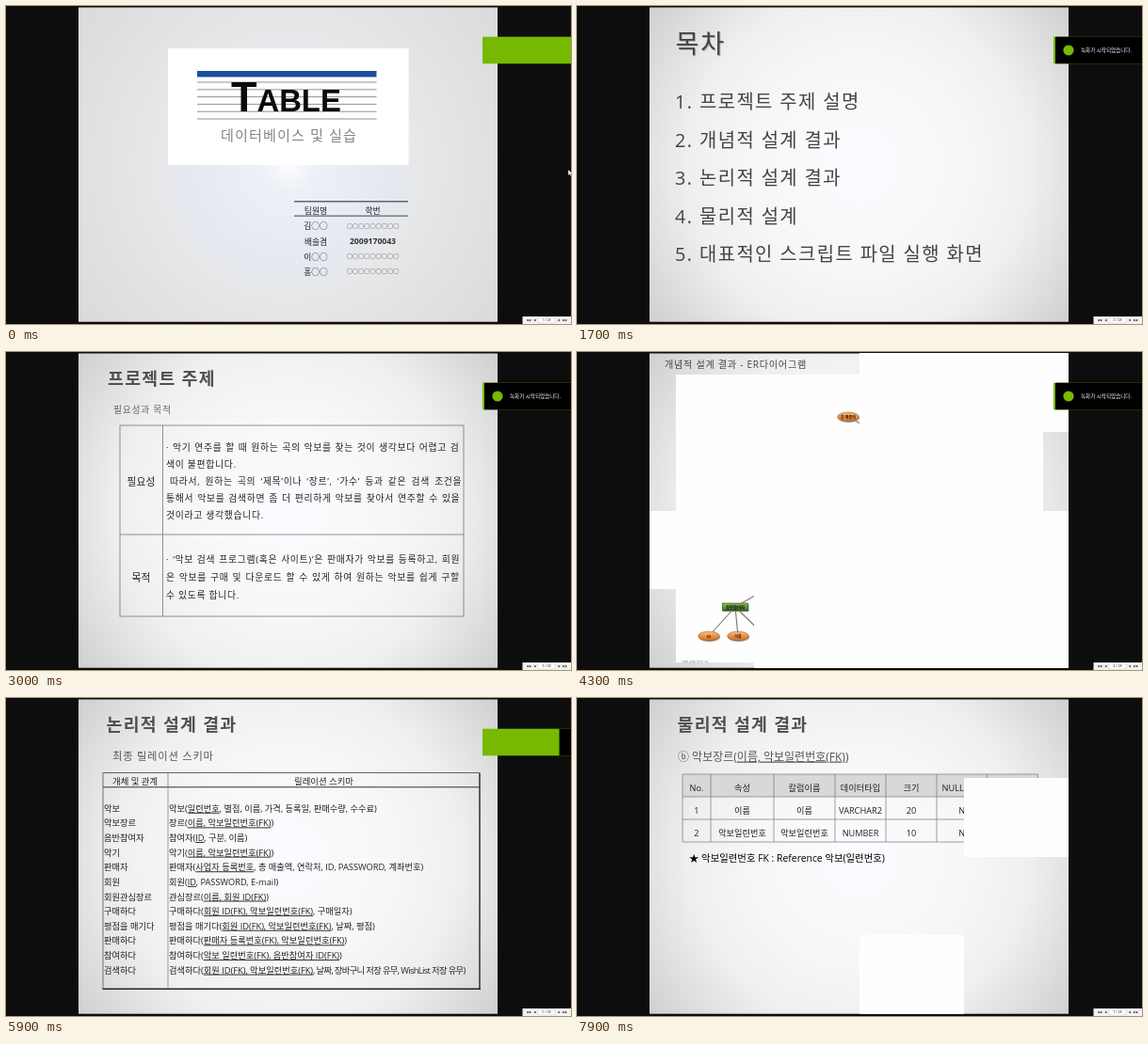
An HTML page for the animation above (8 s loop, 600x338 px).

```html
<!DOCTYPE html>
<html lang="ko">
<head>
<meta charset="utf-8">
<title>Table</title>
<style>
  html, body { margin: 0; width: 100%; height: 100%; overflow: hidden; background: #0d0d0d; }
  svg { display: block; width: 100%; height: 100%; }
  text { font-family: "Open Sans", "Noto Sans CJK KR", "Noto Sans CJK JP", "Noto Sans CJK", sans-serif; }
  .latin { font-family: "Liberation Sans", Arial, sans-serif; }
  .tight { letter-spacing: -.6px; }
</style>
</head>
<body>
<svg id="stage" viewBox="0 0 600 338">
  <defs>
    <radialGradient id="cover" gradientUnits="userSpaceOnUse" cx="300" cy="169" r="280">
      <stop offset="0" stop-color="#fbfcfe"/>
      <stop offset=".1" stop-color="#edf1f7"/>
      <stop offset=".4" stop-color="#e4e8ef"/>
      <stop offset=".48" stop-color="#e7e8ea"/>
      <stop offset="1" stop-color="#dadada"/>
    </radialGradient>
    <radialGradient id="plain" gradientUnits="userSpaceOnUse" cx="300" cy="169" r="280">
      <stop offset="0" stop-color="#fafcff"/>
      <stop offset=".4" stop-color="#f6f7f8"/>
      <stop offset=".65" stop-color="#efefef"/>
      <stop offset="1" stop-color="#cfcfcf"/>
    </radialGradient>
    <linearGradient id="orange" x2="0" y2="1">
      <stop offset="0" stop-color="#fbc08a"/>
      <stop offset=".5" stop-color="#ee8f3c"/>
      <stop offset="1" stop-color="#c9702a"/>
    </linearGradient>
    <linearGradient id="leaf" x2="0" y2="1">
      <stop offset="0" stop-color="#8cc152"/>
      <stop offset="1" stop-color="#3d6b22"/>
    </linearGradient>
  </defs>
  <rect width="600" height="338" fill="#0d0d0d"/>
  <g id="slides"></g>
  <g id="tiles"></g>
  <g id="pager"></g>
  <rect id="green" y="32.7" width="94" height="28.6" fill="#76b900"/>
  <g id="panel"></g>
  <path id="cursor" d="M0 0 L0 6 L1.6 4.7 L2.8 7 L3.8 6.5 L2.7 4.3 L4.6 4 Z" fill="#fff" stroke="#333" stroke-width=".4"/>
</svg>
<script>
const $ = id => document.getElementById(id);

// Text centred vertically on cy; _underscores_ mark underlined parts.
// Tracking makes the glyphs smaller and the spacing wider by the same share.
function text(x, cy, size, str, o = {}) {
  const track = o.track || 0, glyph = size * (1 - track);
  const body = str.replace(/_(.+?)_/g, '<tspan text-decoration="underline">$1</tspan>');
  return `<text x="${x}" y="${cy + glyph * 0.38}" font-size="${glyph}" letter-spacing="${glyph * track}"` +
    ` fill="${o.fill || '#222'}" font-weight="${o.weight || 400}" text-anchor="${o.anchor || 'start'}"` +
    ` word-spacing="${o.gap || 0}">${body}</text>`;
}
const mid = (x, cy, size, str, o) => text(x, cy, size, str, { ...o, anchor: 'middle' });
const loose = (x, cy, size, str, o) => text(x, cy, size, str, { ...o, track: 0.07 });
const rect = (x, y, w, h, fill, extra = '') =>
  `<rect x="${x}" y="${y}" width="${w}" height="${h}" fill="${fill}" ${extra}/>`;
const line = (x1, y1, x2, y2, color, w = 0.7) =>
  `<path d="M${x1} ${y1}L${x2} ${y2}" stroke="${color}" stroke-width="${w}"/>`;
const back = id => rect(77, 1.5, 445, 334.2, `url(#${id})`);
const heading = (x, str) => loose(x, 28, 19.7, str, { fill: '#505050', weight: 700 });

function coverSlide() {
  let s = back('cover') + rect(172, 45, 255.5, 124, '#fff') + rect(203, 69, 190.5, 6.5, '#1f4e9f');
  for (let i = 0; i < 6; i++) s += line(203, 81 + i * 7.8, 393.5, 81 + i * 7.8, '#777', 0.8);
  s += '<text class="latin" x="239" y="112" font-weight="700" font-size="45" fill="#0a0a0a">T<tspan font-size="32.8">ABLE</tspan></text>';
  s += text(300.5, 137, 16.3, '데이터베이스 및 실습', { fill: '#858585', anchor: 'middle', track: 0.07 });
  s += line(306, 207.7, 427, 207.7, '#5d6673', 1.5) + line(306, 223.2, 427, 223.2, '#5d6673', 1.3);
  s += mid(329, 217.5, 8.8, '팀원명', { weight: 500 }) + mid(389.5, 217.5, 8.8, '학번', { weight: 500 });
  ['김○○', '배솔겸', '이○○', '홍○○'].forEach((name, i) => {
    const y = 234 + i * 16.2;
    s += mid(329, y, 8.7, name, { weight: 500 });
    s += i === 1 ? mid(389.5, y, 8.6, '2009170043', { weight: 700, fill: '#333' })
                 : mid(389.5, y - 0.5, 6.2, '○'.repeat(9));
  });
  return s;
}

function contentsSlide() {
  const items = ['프로젝트 주제 설명', '개념적 설계 결과', '논리적 설계 결과', '물리적 설계', '대표적인 스크립트 파일 실행 화면'];
  return back('plain') +
    loose(105.5, 41, 29, '목차', { fill: '#aaa', weight: 500 }) +
    loose(104.5, 40, 29, '목차', { fill: '#444', weight: 500 }) +
    items.map((it, i) => loose(104, 101.8 + i * 40.4, 21.4, `${i + 1}. ${it}`, { fill: '#444' })).join('');
}

function topicSlide() {
  const rows = [
    [170, 101.5, '· 악기 연주를 할 때 원하는 곡의 악보를 찾는 것이 생각보다 어렵고 검', 0.5],
    [170, 119.5, '색이 불편합니다.'],
    [174, 137.5, '따라서, 원하는 곡의 ‘제목’이나 ‘장르’, ‘가수’ 등과 같은 검색 조건을', 1.9],
    [170, 155.5, '통해서 악보를 검색하면 좀 더 편리하게 악보를 찾아서 연주할 수 있을', 0.7],
    [170, 173.5, '것이라고 생각했습니다.'],
    [170, 220.5, '· ‘악보 검색 프로그램(혹은 사이트)’은 판매자가 악보를 등록하고, 회원', 0.6],
    [170, 239.5, '은 악보를 구매 및 다운로드 할 수 있게 하여 원하는 악보를 쉽게 구할', 0.8],
    [170, 258.5, '수 있도록 합니다.']
  ];
  return back('plain') + heading(108, '프로젝트 주제') +
    loose(114, 61.5, 10.6, '필요성과 목적', { fill: '#666' }) +
    rect(121, 78, 365, 203, 'none', 'stroke="#777" stroke-width=".8"') +
    line(121, 194, 486, 194, '#777', 0.8) + line(166.5, 78, 166.5, 281, '#777', 0.8) +
    mid(143.5, 137.5, 10.8, '필요성') + mid(143.5, 240, 10.8, '목적') +
    rows.map(([x, y, str, gap]) => loose(x, y, 10.6, str, { gap })).join('');
}

function diagramSlide() {
  const entities = [[168, 271, '음반참여자'], [300, 200, '악보'], [345, 100, '판매자'],
    [440, 220, '회원'], [310, 282, '악기'], [390, 282, '장르']];
  // x, y, label, owning entity
  const attrs = [[140, 302, 'ID', 0], [171, 302, '이름', 0], [200, 302, '구분', 0],
    [200, 164, '별점', 1], [226, 148, '이름', 1], [256, 140, '가격', 1], [225, 185, '등록일', 1],
    [288, 69, '총 매출액', 2], [330, 58, '연락처', 2], [368, 58, '계좌번호', 2],
    [472, 190, 'ID', 3], [478, 246, '암호', 3], [450, 258, 'E-mail', 3],
    [292, 312, '이름', 4], [325, 312, '번호', 4], [390, 312, '이름', 5]];
  // x, y, label, linked entities
  const links = [[225, 238, '참여', 0, 1], [324, 150, '판매', 1, 2], [370, 188, '구매', 1, 3],
    [375, 220, '검색', 1, 3], [306, 242, '연주', 1, 4], [420, 255, '관심', 3, 5]];
  const tie = (x, y, e) => line(x, y, entities[e][0], entities[e][1], '#777', 1.1);
  let s = back('plain') + rect(105, 24, 390, 306, '#fefefe') +
    loose(93, 13, 10.9, '개념적 설계 결과 - ER다이어그램', { fill: '#444' });
  attrs.forEach(([x, y, , e]) => s += tie(x, y, e));
  links.forEach(([x, y, , a, b]) => s += tie(x, y, a) + tie(x, y, b));
  attrs.forEach(([x, y, label]) => s +=
    `<ellipse cx="${x + 0.8}" cy="${y + 1}" rx="11.5" ry="5" fill="#aaa"/>` +
    `<ellipse cx="${x}" cy="${y}" rx="11.3" ry="5" fill="url(#orange)" stroke="#8a5a33" stroke-width=".6"/>` +
    mid(x, y, 4, label, { weight: 700 }));
  links.forEach(([x, y, label]) => s +=
    `<path d="M${x - 14} ${y}l14 -7l14 7l-14 7z" fill="#9db7d6" stroke="#4a6484" stroke-width=".6"/>` + mid(x, y, 4, label));
  entities.forEach(([x, y, label]) => s += rect(x - 12.5, y - 3, 27, 8, '#999') +
    rect(x - 13.5, y - 4, 27, 8, 'url(#leaf)', 'stroke="#2c4418" stroke-width=".6"') +
    mid(x, y, 4.4, label, { weight: 700, fill: '#111' }));
  return s + text(111, 328.6, 2.6, '개체와 관계를 정리한 그림', { fill: '#777' });
}

function schemaSlide() {
  const rows = [
    ['악보', '악보(_일련번호_, 별점, 이름, 가격, 등록일, 판매수량, 수수료)'],
    ['악보장르', '장르(_이름, 악보일련번호(FK)_)'],
    ['음반참여자', '참여자(_ID_, 구분, 이름)'],
    ['악기', '악기(_이름, 악보일련번호(FK)_)'],
    ['판매자', '판매자(_사업자 등록번호_, 총 매출액, 연락처, ID, PASSWORD, 계좌번호)'],
    ['회원', '회원(_ID_, PASSWORD, E-mail)'],
    ['회원관심장르', '관심장르(_이름, 회원 ID(FK)_)'],
    ['구매하다', '구매하다(_회원 ID(FK), 악보일련번호(FK)_, 구매일자)'],
    ['평점을 매기다', '평점을 매기다(_회원 ID(FK), 악보일련번호(FK)_, 날짜, 평점)'],
    ['판매하다', '판매하다(_판매자 등록번호(FK), 악보일련번호(FK)_)'],
    ['참여하다', '참여하다(_악보 일련번호(FK), 음반참여자 ID(FK)_)'],
    ['검색하다', '검색하다(_회원 ID(FK), 악보일련번호(FK)_<tspan class="tight">, 날짜, 장바구니 저장 유무, WishList 저장 유무)</tspan>']
  ];
  return back('plain') + heading(106.5, '논리적 설계 결과') +
    loose(113, 61.5, 12.1, '최종 릴레이션 스키마', { fill: '#555' }) +
    line(102.5, 79.5, 503.5, 79.5, '#555', 0.9) + line(103, 94.7, 503, 94.7, '#333', 1.1) +
    line(102.5, 309.3, 504, 309.3, '#222', 1.4) + line(103, 80, 103, 309, '#555', 0.8) +
    line(503, 80, 503, 309, '#222', 1.4) + line(172, 80, 172, 309, '#777', 0.7) +
    mid(137, 88.5, 9.4, '개체 및 관계') + mid(337.5, 88.5, 9.4, '릴레이션 스키마') +
    rows.map(([a, b], i) => {
      const y = 117.3 + i * 15.62;
      return text(104, y, 9.25, a) + text(173, y, 9.25, b);
    }).join('');
}

function tableSlide(sub, rows, note = '') {
  const xs = [112, 142, 209, 274, 328, 382, 435.5, 489.5], top = 81, h = 24;
  const bottom = top + h * (rows.length + 1);
  const all = [['No.', '속성', '칼럼이름', '데이터타입', '크기', 'NULL 허용', '비고'], ...rows];
  let s = back('plain') + heading(106.5, '물리적 설계 결과') + text(107, 62, 12, sub, { fill: '#555' }) +
    rect(112, top, 377.5, h, '#d8d8d8');
  xs.forEach(x => s += line(x, top, x, bottom, '#777'));
  all.forEach((row, r) => {
    s += line(112, top + r * h, 489.5, top + r * h, '#777');
    row.forEach((cell, c) => s += mid((xs[c] + xs[c + 1]) / 2, top + r * h + 14.3, 9.2, cell));
  });
  return s + line(112, bottom, 489.5, bottom, '#777') + text(119, 170.5, 10.4, note, { fill: '#000' });
}

const column = ([name, type, size], i) => [`${i + 1}`, name, name, type, `${size}`, 'N', ''];
const score = [['일련번호', 'NUMBER', 10], ['별점', 'NUMBER', 2], ['이름', 'VARCHAR2', 40], ['가격', 'NUMBER', 10],
  ['등록일', 'DATE', ''], ['판매수량', 'NUMBER', 10], ['수수료', 'NUMBER', 10]];
const genre = [['이름', 'VARCHAR2', 20], ['악보일련번호', 'NUMBER', 10]];

const slides = [
  coverSlide(), contentsSlide(), topicSlide(), diagramSlide(), schemaSlide(),
  tableSlide('ⓐ 악보(_일련번호_, 별점, 이름, 가격, 등록일, 판매수량, 수수료)', score.map(column)),
  tableSlide('ⓑ 악보장르(_이름, 악보일련번호(FK)_)', genre.map(column), '★ 악보일련번호 FK : Reference 악보(일련번호)')
];
$('slides').innerHTML = slides.map(s => `<g>${s}</g>`).join('');

// start time, slide, tiles of the 4 x 4 grid that are still blank
const cues = [
  [0, 0, []],
  [1600, 1, [6, 13]], [1700, 1, []],
  [2900, 2, [7, 14]], [3000, 2, []],
  [4300, 3, [2, 3, 5, 6, 8, 9, 10, 11, 13, 14, 15]], [4400, 3, [6, 9, 14]], [4500, 3, []],
  [5400, 4, [5, 10]], [5500, 4, []],
  [6600, 5, [6, 13]], [6700, 5, []],
  [7900, 6, [7, 14]]
];

// Tile edges sit on whole pixels so neighbours leave no seam.
const edge = (start, size, i) => Math.round(start + size * i);
$('tiles').innerHTML = Array.from({ length: 16 }, (_, i) => {
  const c = i % 4, r = Math.floor(i / 4);
  const x = edge(77, 111.25, c), y = edge(1, 83.75, r);
  return rect(x, y, edge(77, 111.25, c + 1) - x, edge(1, 83.75, r + 1) - y, '#fefefe');
}).join('');

$('pager').innerHTML = rect(548.5, 330, 51.5, 8, '#f2f2f2') +
  rect(565, 331, 18, 6, '#fff', 'stroke="#bbb" stroke-width=".4"') +
  mid(555, 334, 2.6, '◀◀') + mid(561.5, 334, 2.6, '◀') +
  mid(574, 334, 3.6, '').replace('<text', '<text id="page"') +
  mid(587.5, 334, 2.6, '▶') + mid(593.5, 334, 2.6, '▶▶');

$('panel').innerHTML = rect(0, 32.7, 92, 28.6, '#000') +
  '<g id="notice"><circle cx="14" cy="47" r="5.6" fill="#76b900"/>' +
  text(27, 47.2, 5.55, '녹화가 시작되었습니다.', { fill: '#fff' }) + '</g>';

const clamp = v => Math.max(0, Math.min(1, v));
const smooth = v => v * v * (3 - 2 * v);
const mix = (a, b, k) => a + (b - a) * k;
const show = (el, on) => el.setAttribute('display', on ? 'inline' : 'none');
const move = (el, x, y) => el.setAttribute('transform', `translate(${x} ${y})`);

function draw(t) {
  const [, current, blank] = cues.filter(c => c[0] <= t).pop();
  [...$('slides').children].forEach((g, i) => show(g, i === current));
  [...$('tiles').children].forEach((r, i) => show(r, blank.includes(i)));
  $('page').textContent = `${current + 1} / 28`;

  const enter = 1 - (1 - clamp(t / 600)) ** 3;
  const leave = smooth(clamp((t - 5700) / 260));
  move($('panel'), 600 - 92 * enter + 92 * leave, 0);
  $('notice').setAttribute('opacity', clamp((t - 900) / 500));
  show($('notice'), t < 5800);
  $('green').setAttribute('x', 506 + 94 * smooth(clamp((t - 5950) / 250)));

  const out = smooth(clamp(t / 400)), home = smooth(clamp((t - 400) / 400));
  move($('cursor'), mix(mix(597, 315, out), 590, home), mix(mix(174, 216, out), 203, home));
  show($('cursor'), t < 1000);
}

const begin = performance.now();
function tick() {
  const t = (performance.now() - begin) % 8000;
  draw(Math.floor(t / 100) * 100);
  requestAnimationFrame(tick);
}
tick();
</script>
</body>
</html>
```
